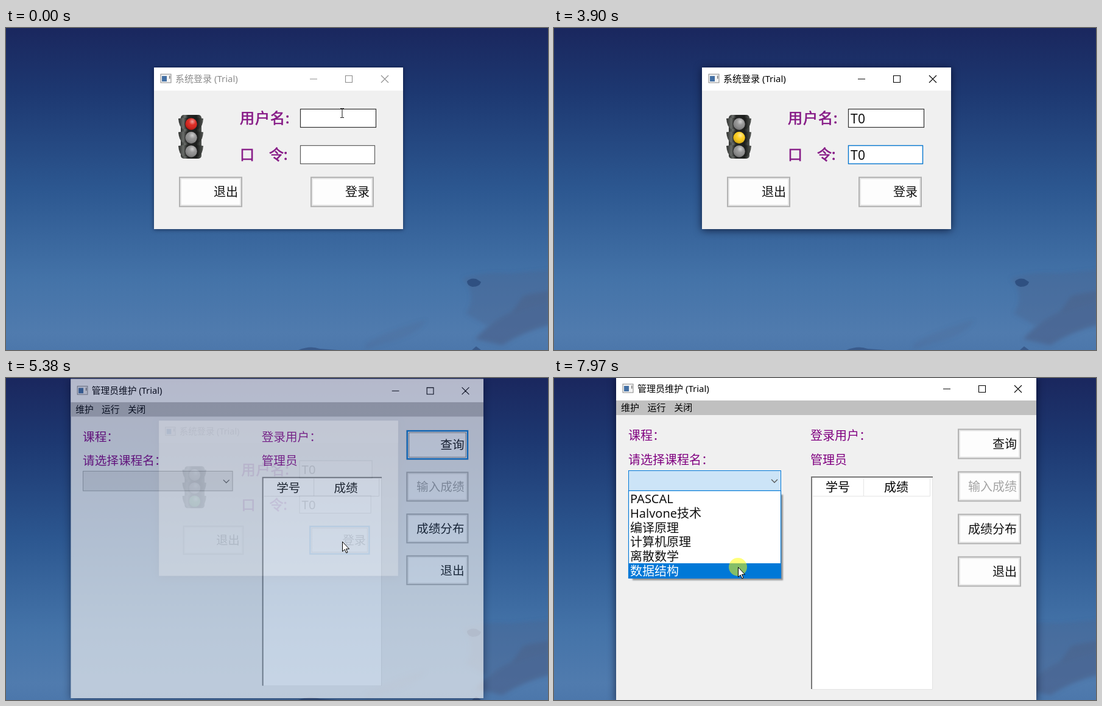
Write an HTML page that moves like this. It is 890 by 530 pixels and loops after 8 s.

```html
<!DOCTYPE html>
<html lang="zh">
<meta charset="utf-8">
<title>系统登录</title>
<style>
  html, body { margin: 0; width: 100%; height: 100%; overflow: hidden; background: #2c568f }
  svg { display: block; width: 890px; height: 530px }
  text { font: 20px "Noto Sans", "Noto Sans CJK SC", "Noto Sans CJK", sans-serif; white-space: pre }
  .title { font-size: 15px }
  .caption { font-size: 24px; fill: #861a86; stroke: #861a86; stroke-width: .7 }
  .purple { fill: #800080 }
  .line { fill: none; stroke: #000; stroke-width: 1.1 }
  .inactive { opacity: .45 }
  .frame { fill: #f0f0f0; filter: drop-shadow(0 2px 7px rgba(0, 0, 20, .65)) }
  .blue { fill: none; stroke: #0078d7 }
</style>
<svg id="stage" viewBox="0 0 890 530"></svg>
<script>
const STEP = 92.7, LOOP = 8000;
const courses = ['PASCAL', 'Halvone技术', '编译原理', '计算机原理', '离散数学', '数据结构'];
const lampColors = ['#d9150d', '#ffc90a', '#45a04c'];
const rowTop = i => 186.2 + 23.85 * i;

// y is the vertical middle of the line
const text = (x, y, str, attrs = '', size = 20) =>
  `<text x="${x}" y="${y + size * .37}" ${attrs}>${str}</text>`;
const rect = (x, y, w, h, attrs) =>
  `<rect x="${x}" y="${y}" width="${w}" height="${h}" ${attrs}/>`;

const titleBar = (left, right, top, mid, title, id) => `
  ${rect(left, top, right - left, mid + 19.5 - top, 'fill="#fff"')}
  ${rect(left + 11, mid - 7.5, 17, 14, 'fill="#f4f4f4" stroke="#8a8a8a"')}
  ${rect(left + 13, mid - 4.5, 8, 9, 'fill="#4470a4"')}
  ${rect(left + 25, mid - 5, 1.5, 5, 'fill="#777"')}
  <g id="${id}Title">
    ${text(left + 35, mid, title, 'class="title"', 15)}
    <path id="${id}Controls" class="line" d="M${right - 153} ${mid + .5}h12M${right - 94.5} ${mid - 5}h11v11h-11z
      M${right - 36} ${mid - 5.5}l12 12m0-12l-12 12"/>
  </g>`;

const button = (x, y, label, id = '', color = '#111') => `
  ${rect(x, y, 102, 48, 'fill="#e6e6e6" stroke="#b2b2b2" stroke-width="2"')}
  ${rect(x + 3, y + 3, 96, 42, 'fill="#fdfdfd"')}
  ${id && `<g id="${id}" class="blue">${rect(x + .5, y + .5, 101, 47, 'stroke-width="2.2"')}
    ${rect(x + 3.5, y + 3.5, 95, 41, 'stroke="#222" stroke-dasharray="1 1"')}</g>`}
  ${text(x + 96, y + 24, label, `text-anchor="end" fill="${color}"`)}`;

const field = (id, y, w) => `
  ${rect(483.5, y + .5, w, 30, `id="${id}Box" fill="#fff" stroke-width="1.2"`)}
  ${rect(483.5, y + .5, w, 30, `id="${id}Focus" class="blue" stroke-width="1.3"`)}
  <text id="${id}Text" x="487" y="${y + 23.5}" fill="#111" letter-spacing=".3" style="font-size:21px"></text>`;

const lamp = i => {
  const y = 158 + 22.5 * i;
  return `<path d="M290 ${y - 10}L283 ${y - 9}Q284 ${y + 4} 290 ${y + 8}H317Q323 ${y + 4} 324 ${y - 9}L317 ${y - 10}Z" fill="url(#metal)"/>
    <circle cx="304" cy="${y}" r="10.5" fill="#222"/>
    <circle id="lamp${i}" cx="304" cy="${y}" r="9.7"/>
    <circle cx="304" cy="${y}" r="9.7" fill="url(#shine)"/>`;
};

stage.innerHTML = `
  <defs>
    <linearGradient id="sky" x2="0" y2="1">
      <stop stop-color="#1a275e"/><stop offset=".2" stop-color="#1d3871"/>
      <stop offset=".5" stop-color="#2c5790"/><stop offset=".78" stop-color="#4473a8"/>
      <stop offset=".95" stop-color="#507bae"/><stop offset="1" stop-color="#4c77ab"/>
    </linearGradient>
    <linearGradient id="metal"><stop stop-color="#2c2e2c"/><stop offset=".2" stop-color="#6a6d6a"/>
      <stop offset=".35" stop-color="#242624"/><stop offset=".75" stop-color="#1c1e1c"/>
      <stop offset="1" stop-color="#555855"/></linearGradient>
    <radialGradient id="shine" cx=".6" cy=".3" r=".75">
      <stop stop-color="#fff" stop-opacity=".6"/><stop offset=".4" stop-color="#fff" stop-opacity=".1"/>
      <stop offset="1" stop-opacity=".25"/></radialGradient>
    <filter id="soft" x="-20%" y="-20%" width="140%" height="140%"><feGaussianBlur stdDeviation="3"/></filter>
  </defs>
  ${rect(0, 0, 890, 530, 'fill="url(#sky)"')}
  <g fill="#4b648f" filter="url(#soft)">
    <path d="M750 412Q790 400 826 404L894 398V450L830 470L790 490L755 470Q775 440 750 412Z" opacity=".4"/>
    <path d="M770 512Q800 480 830 468L850 440L894 432V488Q850 500 815 522Z" opacity=".75"/>
    <path d="M590 520Q620 500 690 480Q680 502 640 514T590 530Z" opacity=".22"/>
  </g>
  <path d="M757 417Q762 411 772 413L780 418Q778 426 766 426Q757 424 757 417Z" fill="#2f5081"/>
  <path d="M480 530Q500 522 515 528L545 530ZM765 530L772 524L780 530Z" fill="#395a8b"/>

  <g id="login">
    ${rect(243, 65, 409, 266, 'class="frame" id="loginFrame"')}
    ${titleBar(243, 652, 65, 83.5, '系统登录 (Trial)', 'login')}
    ${rect(287, 143, 34, 72, 'rx="5" fill="url(#metal)"')}
    ${[0, 1, 2].map(lamp).join('')}
    ${text(384, 148.5, '用户名:', 'class="caption" letter-spacing="1"', 24)}
    ${text(384, 208.5, '口　令:', 'class="caption"', 24)}
    ${field('user', 133, 124)}
    ${field('pass', 193, 122)}
    ${rect(0, 0, 1.5, 23, 'id="caret"')}
    ${button(285, 245.8, '退出')}
    ${button(501, 245.8, '登录', 'loginFocus')}
  </g>

  <g id="main">
    ${rect(102, -2, 690, 535, 'class="frame"')}
    ${titleBar(102, 792, -2, 17.5, '管理员维护 (Trial)', 'main')}
    ${rect(102, 37, 690, 24, 'fill="#c0c0c0"')}
    ${['维护', '运行', '关闭'].map((s, i) => text(110 + 43.6 * i, 48.5, s, 'class="title"', 15)).join('')}
    <g class="purple">
      ${text(122, 95, '课程：')}${text(122, 134.5, '请选择课程名：')}
      ${text(421, 95, '登录用户：')}${text(421, 134.5, '管理员')}
    </g>
    ${rect(122.5, 152.5, 250, 33, 'id="combo"')}
    <path d="M357 167l5 5 5-5" fill="none" stroke="#555" stroke-width="1.3"/>
    ${rect(422, 162, 200, 351, 'fill="#fff"')}
    <path d="M621.5 163V512.5H423" fill="none" stroke="#e3e3e3"/>
    <path d="M423 512V163H622" fill="none" stroke="#777" stroke-width="2"/>
    <path d="M425 194.5H617.5V165M508.5 165V194" fill="none" stroke="#e5e5e5"/>
    ${text(446, 180, '学号')}${text(542, 180, '成绩')}
    ${button(664, 84.5, '查询', 'queryFocus')}
    ${button(664, 154.5, '输入成绩', '', '#a4a4a4')}
    ${button(664, 224.5, '成绩分布')}
    ${button(664, 294.5, '退出')}
    <g id="list">
      ${rect(129, 192, 247, 141, 'fill="#666" opacity=".65" style="filter:blur(1.2px)"')}
      ${rect(122.5, 185.5, 250, 144, 'fill="#fff" stroke="#0078d7" stroke-width="1.2"')}
      ${rect(122, 0, 250.5, 24.2, 'id="highlight" fill="#0078d7"')}
      ${courses.map((s, i) => text(125, rowTop(i) + 12.3, s, `id="course${i}"`)).join('')}
    </g>
  </g>

  <g id="pointer">
    <circle id="click" r="15" fill="#ff0" fill-opacity=".52"/>
    <path id="arrow" d="M.5 .5V16.5L4.2 13.2L6.8 19L9 18L6.5 12.3H11.5Z" fill="#fff" stroke="#000"/>
    <path id="ibeam" d="M-3 -7.5h2.5l.5 .5 .5-.5h2.5M0 -7V7M-3 7.5h2.5l.5-.5 .5 .5h2.5" fill="none" stroke="#111"/>
  </g>`;

const $ = id => document.getElementById(id);
const set = (id, attrs) => { for (const k in attrs) $(id).setAttribute(k, attrs[k]); };
const show = (id, on) => set(id, { visibility: on ? 'inherit' : 'hidden' });
const fade = (id, opacity) => set(id, { opacity });
const within = (k, a, b) => k >= a && k < b;
const ramp = (k, a, b) => Math.min(1, Math.max(0, (k - a) / (b - a)));
const glide = (k, a, b, from, to) => {
  const p = ramp(k, a, b), e = p * p * (3 - 2 * p);
  return from.map((v, i) => v + (to[i] - v) * e);
};
const scaleAbout = (id, x, y, s) =>
  set(id, { transform: `translate(${x} ${y}) scale(${s}) translate(${-x} ${-y})` });

function pointerAt(k) {
  if (k < 1) return [551.5, 140];
  if (k < 10) return [549.5, k < 6 ? 144 : 145];
  if (k < 64) return glide(k, 46, 53, [549.5, 145], [552, 269]);
  if (k < 76) return glide(k, 63, 69, [552, 269], [341, 162]);
  return glide(k, 75, 84, [341, 162], [302, 311]);
}

function drawLogin(k, y) {
  const closing = k >= 57;
  show('login', k < 59);
  fade('login', closing ? (k < 58 ? .76 : .3) : 1);
  scaleAbout('login', 447.5, 198, closing ? (k < 58 ? .99 : .96) : 1);
  set('loginTitle', { class: k < 1 || closing ? 'inactive' : '' });
  show('loginControls', !closing);
  $('loginFrame').style.filter = k < 1 ? 'drop-shadow(0 1px 3px rgba(0,0,20,.5))' : '';

  const lit = k < 23 ? 0 : k < 43 ? 1 : 2;
  lampColors.forEach((c, i) => set('lamp' + i, { fill: i === lit ? c : '#8b8b8b' }));

  $('userText').textContent = 'T0'.slice(0, (k >= 10) + (k >= 17));
  $('passText').textContent = 'T0'.slice(0, (k >= 32) + (k >= 36));
  set('userBox', { stroke: k < 48 ? '#303030' : '#7a7a7a' });
  set('passBox', { stroke: k < 1 ? '#5c5c5c' : within(y, 193, 224) ? '#303030' : '#7a7a7a' });
  fade('userFocus', ramp(k, 0, 4) - ramp(k, 22, 26));
  fade('passFocus', ramp(k, 22, 26) - ramp(k, 42, 45));
  fade('loginFocus', ramp(k, 42, 45));

  const inUser = k < 23;
  const typed = $(inUser ? 'userText' : 'passText').textContent;
  set('caret', { x: [486.5, 499.3, 510.6][typed.length], y: inUser ? 137 : 197 });
  show('caret', within(k, 1, 15) || within(k, 17, 23) || within(k, 24, 31) || within(k, 32, 42));
}

function drawMain(k, y) {
  show('main', k >= 57);
  const phase = Math.min(3, Math.max(0, k - 57));
  fade('main', [.28, .68, .94, 1][phase]);
  scaleAbout('main', 347, 200, [.96, .982, .995, 1][phase]);
  show('queryFocus', within(k, 57, 70));
  const open = k >= 71;
  set('combo', {
    fill: k < 68 ? '#e1e1e1' : k < 70 ? '#e5f1fb' : '#cce4f7',
    stroke: k < 68 ? '#a6a6a6' : '#0078d7'
  });
  show('list', open);
  const row = open ? Math.floor((y - rowTop(0)) / 23.85) : -1;
  show('highlight', row >= 0);
  if (row >= 0) set('highlight', { y: rowTop(row) - .5 });
  courses.forEach((_, i) => set('course' + i, { fill: i === row ? '#fff' : '#111' }));
}

function drawPointer(k, [x, y]) {
  const overField = k < 57 && (within(y, 133, 164) || within(y, 193, 224));
  show('pointer', k < 10 || k >= 47);
  set('pointer', { transform: `translate(${Math.round(x)} ${Math.round(y)})` });
  fade('ibeam', +overField);
  fade('arrow', +!overField);
  fade('click', +(within(k, 1, 4) || within(k, 53, 55) || within(k, 69, 71) || k >= 86));
}

function frame() {
  const k = Math.floor((performance.now() % LOOP + 4) / STEP);
  const at = pointerAt(k);
  drawLogin(k, at[1]);
  drawMain(k, at[1]);
  drawPointer(k, at);
  requestAnimationFrame(frame);
}
frame();
</script>
</html>
```
